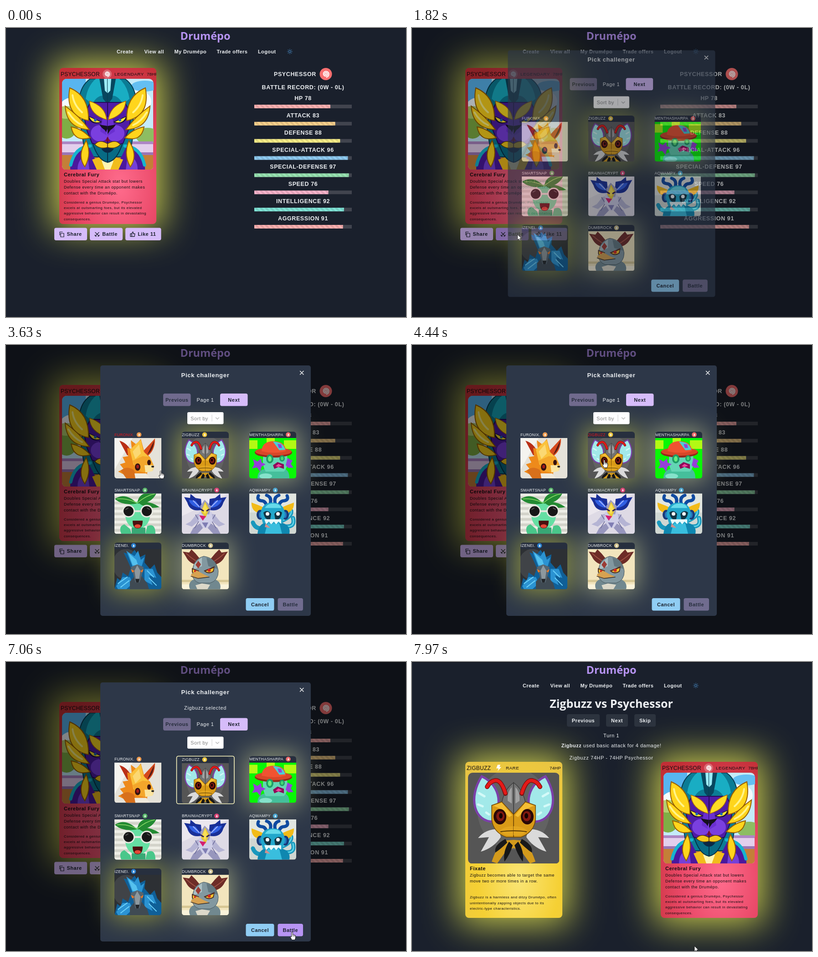
These frames come from a looping animation (878 by 637 pixels, 8 s). An HTML page:

```html
<!DOCTYPE html>
<html lang="en">
<head>
<meta charset="utf-8">
<title>Pick challenger</title>
<style>
  html, body { margin: 0; width: 100%; height: 100%; overflow: hidden; background: #1a202c; }
  svg { display: block; }
  text { font-family: "Liberation Sans", Arial, sans-serif; white-space: pre; }
  .display { font-family: "Open Sans", "Noto Sans", sans-serif; }
</style>
</head>
<body>
<svg id="stage" width="878" height="637" viewBox="0 0 878 637"></svg>
<script>
const LOOP = 8000;
const OPEN = 1610, SELECT = 4620, PRESS = 6880, RELEASE = 7060, FIGHT = 7150;
const LILAC = '#d6bcfa', LILAC_HOVER = '#b794f4', LILAC_DOWN = '#9f7aea', INK = '#1a202c', PALE = '#edf0f3';

// ---- drawing helpers ----
const path = (fill, d, extra = '') => `<path fill="${fill}" d="${d}" ${extra}/>`;
const line = (color, width, d) => path('none', d, `stroke="${color}" stroke-width="${width}" stroke-linecap="round" stroke-linejoin="round"`);
const dot = (fill, x, y, rx, ry = rx, extra = '') => `<ellipse fill="${fill}" cx="${x}" cy="${y}" rx="${rx}" ry="${ry}" ${extra}/>`;
const box = (fill, x, y, w, h, r = 0, extra = '') => `<rect fill="${fill}" x="${x}" y="${y}" width="${w}" height="${h}" rx="${r}" ${extra}/>`;
const at = (x, y, body, extra = '') => `<g transform="translate(${x} ${y})" ${extra}>${body}</g>`;
const mirror = (body, width = 200) => `${body}<g transform="matrix(-1 0 0 1 ${width} 0)">${body}</g>`;
const glow = (color, w, h, spread, blur, opacity) =>
  box(color, -spread, -spread, w + 2 * spread, h + 2 * spread, 8, `style="filter:blur(${blur}px)" opacity="${opacity}"`);
const shift = (dy, body) => `<g class="shift" data-dy="${dy}">${body}</g>`;

function text(x, y, content, size = 11, { fill = PALE, bold = false, anchor = 'start', spacing = .5, extra = '' } = {}) {
  return `<text x="${x}" y="${y + size * .36}" font-size="${size}" fill="${fill}" text-anchor="${anchor}"
    letter-spacing="${spacing}" font-weight="${bold ? 700 : 400}" ${extra}>${content}</text>`;
}
const centered = (x, y, content, size, options) => text(x, y, content, size, { anchor: 'middle', ...options });
const heading = (x, y, content, size, fill) => centered(x, y, content, size, { fill, bold: true, spacing: 0, extra: 'class="display"' });

function button(x, y, w, label, { fill = LILAC, color = INK, id = '', icon = '', extra = '' } = {}) {
  return `<g ${extra}>${box(fill, x, y, w, 27.5, 4, id && `id="${id}"`)}
    ${at(x + 16, y + 14, icon)}${centered(x + w / 2 + (icon ? 8 : 0), y + 14, label, 11, { fill: color, bold: true })}</g>`;
}

const swirl = line('#fff', 2, 'M' + Array.from({ length: 30 }, (_, i) => {
  const angle = i * .48, radius = 1 + i * .22;
  return `${(radius * Math.cos(angle)).toFixed(1)} ${(radius * Math.sin(angle)).toFixed(1)}`;
}).join('L'));
const bolt = path('#fff', 'M-2 -7H4L2 -2H6L-2 7L0 1H-5Z');

// ---- creatures: the two fighters on a 200 grid, the others on 103 x 89 ----
const art = {
  psychessor: box('#c4ebfa', 0, 0, 200, 200) + box('#58b5f0', 0, 0, 52, 60) +
    dot('#f4fbff', 30, 60, 34, 20) + dot('#f4fbff', 168, 50, 28, 24) + dot('#64bff2', 182, 16, 30, 12) +
    dot('#7fae45', 10, 96, 26, 36) + dot('#b3cf70', 8, 74, 20, 14) + dot('#8dbd62', 188, 126, 26, 18) +
    box('#e3cfec', 0, 138, 200, 30) + box('#ad86c4', 0, 138, 200, 6) + box('#9a76b5', 0, 162, 200, 6) + box('#c47f38', 0, 168, 200, 32) +
    mirror(
      path('#0b7c95', 'M100 0H62Q42 14 38 42L46 62 42 112 52 172H100Z', 'stroke="#063b50" stroke-width="2"') +
      path('#19adc3', 'M100 0H74Q56 16 52 44L66 56Q82 28 100 42Z') +
      path('#07475f', 'M82 0H100V56L90 44Z') + path('#9cecf7', 'M92 0H100V32L94 26Z') +
      path('#4b189d', 'M18 200Q16 165 58 148L84 200Z') + line('#16b4cf', 7, 'M62 148Q28 150 19 190') +
      path('#7440d8', 'M34 200Q34 175 56 168L60 200Z') +
      path('#f1bd1c', 'M66 178L100 168V200H76Z') + path('#fff6b4', 'M87 181L100 175V200H94Z') +
      path('#086b85', 'M66 138H100V184Q78 180 66 138Z', 'stroke="#052f48" stroke-width="2"') +
      path('#4f1ca6', 'M100 52L62 52 48 80 54 112 66 142 100 152Z', 'stroke="#250a59" stroke-width="2"') +
      dot('#7a3fdf', 83, 120, 20, 18) + path('#6a2fd0', 'M100 84L88 90 84 116 100 126Z') +
      path('#ffdc24', 'M60 49Q62 80 98 90Q95 60 60 49Z', 'stroke="#a76a08" stroke-width="1.5"') +
      path('#1c1038', 'M54 80L88 95Q64 106 54 80Z') + path('#ffe52e', 'M60 84L84 95Q66 100 60 84Z') + dot('#1e69b5', 73, 91, 3) +
      path('#15101d', 'M100 104L82 101Q88 110 93 112L100 122Z') + path('#8d1130', 'M100 126L95 138H100Z') +
      path('#f3c91d', 'M100 143Q82 132 72 145Q84 156 100 151Z', 'stroke="#5b3906" stroke-width="1.5"') +
      path('#0a2846', 'M100 152L86 154Q92 163 100 163Z') +
      ['M58 92Q6 82 17 20Q60 38 58 92Z', 'M60 112Q10 110 7 60Q38 82 60 112Z', 'M62 130Q26 140 20 106Q44 110 62 130Z', 'M53 136Q66 166 50 194Q36 174 46 150Z']
        .map(d => path('#ffd51c', d, 'stroke="#996000" stroke-width="2"')).join('') +
      line('#fff48a', 4, 'M23 36Q26 58 44 74M14 74Q26 94 44 102')),

  zigbuzz: box('#555', 0, 0, 200, 200) + dot('#626262', 100, 80, 80, 90) +
    mirror(
      path('#a2e9e9', 'M30 8C60 22 68 48 67 66L58 108C12 110 0 54 30 8Z', 'stroke="#7b40a8" stroke-width="5"') +
      line('#d4faf8', 5, 'M24 45L36 52M22 70L32 74M40 88L46 92') +
      path('#dadada', 'M68 124Q38 124 22 144L46 142 28 174Q56 166 72 142Z') +
      path('#d39a1c', 'M100 148L76 150Q62 166 52 196L64 200 84 172 100 166Z') +
      path('#191919', 'M82 146Q56 160 60 176Q72 168 86 154Z') + path('#161616', 'M90 152Q76 174 80 196Q92 180 98 160Z') +
      path('#737373', 'M100 22Q80 36 74 66L100 92Z', 'stroke="#3c3c3c" stroke-width="1.5"') + path('#a3a3a3', 'M96 32Q86 42 87 62L96 68Z') +
      path('#d99a17', 'M52 72L74 64 100 92V142H84Q56 132 52 104Z', 'stroke="#6f4705" stroke-width="1.5"') +
      path('#f4be35', 'M55 73L74 66 97 94 90 98Q74 78 55 73Z') +
      dot('#2a0907', 70, 97, 14, 17) + dot('#821a11', 71, 96, 9, 11) + dot('#150303', 72, 95, 4, 6) +
      path('#e2a51f', 'M100 118Q78 118 70 128Q78 140 100 138Z') + line('#563705', 2, 'M100 128Q84 128 72 130') +
      line('#791010', 10, 'M82 46Q73 16 60 17Q48 19 42 31') + line('#e51a18', 7, 'M82 45Q73 16 60 17Q48 19 42 31')),

  furonix: box('#e5e2d9', 0, 0, 103, 89) + path('#f5f4ef', 'M0 0H40L0 70Z') +
    path('#b92f16', 'M11 6Q32 12 40 38L28 38Z') + path('#d64a1c', 'M89 1Q90 28 70 42L64 28Z') + path('#571c16', 'M87 6Q86 26 72 37Z') +
    path('#ee8a1b', 'M24 82L8 74 20 68 12 58 24 54 18 42 30 40 28 22 38 24 36 5 48 14 58 2 66 32 78 42 70 89H32Z') +
    path('#fac23c', 'M34 26L46 14 58 4 64 30 76 42 56 46 42 60Z') + path('#fbd872', 'M40 30L54 14 58 34 46 46Z') +
    path('#f3a62b', 'M40 50L62 40 78 42 87 62 84 72 66 76 48 72Z') + path('#d8701b', 'M14 72Q26 60 42 70L52 89H26Z') +
    path('#fbe5a1', 'M66 60L86 60 84 73 68 76Z') + dot('#351210', 51, 64, 6, 8) + dot('#a41c1a', 51, 63, 3, 4) +
    dot('#351210', 76, 54, 4, 6) + dot('#222', 84, 63, 3, 2) + path('#efe9dc', 'M44 78L70 78 78 89H46Z'),

  menthasharpa: box('#09f706', 0, 0, 103, 89) + path('#b3f914', 'M0 5H18V24H0ZM38 0H56V14H38ZM76 5H103V24H76Z') +
    path('#45bf9b', 'M18 89Q18 70 36 68H74Q88 68 88 89Z') + path('#63d5b4', 'M32 34H82Q88 62 76 74H36Q26 56 32 34Z') +
    path('#9540d8', 'M8 46L18 52 26 45 27 54 36 58 27 63 24 74 17 65 6 67 11 58ZM84 44L95 50 91 57 97 65 86 66 80 60Z') +
    path('#8d0b59', 'M52 60L62 53 76 58 76 68 64 64 55 68Z') + path('#ef429b', 'M58 62L64 57 72 61 64 64Z') +
    dot('#92281b', 53, 32, 41, 11) + dot('#d84728', 53, 30, 40, 9) + path('#f05331', 'M27 29Q28 7 54 7Q80 8 80 29Q54 36 27 29Z') +
    path('#4cced5', 'M52 8Q74 8 79 26L66 27Z') + path('#9540d8', 'M62 13L70 14 72 22 65 22Z') +
    dot('#1f9c67', 45, 46, 8, 10) + dot('#64ed80', 45, 46, 4, 6) + dot('#1f9c67', 72, 45, 6, 7) + dot('#45d874', 72, 45, 3, 4) + dot('#85e2ca', 36, 84, 14, 6),

  smartsnap: box('#d3d3ca', 0, 0, 103, 89) + Array.from({ length: 8 }, (_, i) => box('#eeeee7', 0, i * 12, 103, 6)).join('') +
    path('#49c78a', 'M15 89Q8 72 22 68L34 78 38 89ZM68 89L72 72Q90 64 90 89Z') + dot('#65dfa3', 51, 48, 27, 30) + path('#38a875', 'M38 75H68V89H38Z') +
    path('#238a32', 'M50 22Q18 28 1 12Q24 -4 50 22ZM50 22Q54 -8 92 0Q80 24 50 22ZM52 20Q76 14 99 30Q70 36 52 20Z') + line('#8edb69', 1.5, 'M6 12Q28 10 50 21Q70 4 88 1') +
    mirror(dot('#e6e7df', 31, 39, 14) + dot('#171717', 31, 39, 11) + line('#525252', 2, 'M25 35L30 32'), 102) +
    box('#e6e7df', 42, 37, 18, 4) + path('#4a100f', 'M40 60H62Q62 77 51 77Q40 77 40 60Z') + dot('#e44837', 51, 72, 7, 4),

  brainiacrypt: box('#dedae5', 0, 0, 103, 89) + path('#ebe7ee', 'M0 0H103L0 50Z') +
    mirror(path('#192f97', 'M44 36Q18 42 12 20L5 8 18 10 19 1 30 10 42 12Z') + path('#315fe3', 'M42 32Q20 30 15 14L30 16Z') + line('#a7b8ff', 2, 'M25 16L38 29') +
      path('#b5b4d4', 'M48 42L32 46 19 62 8 68 22 73 38 60 52 66Z') + path('#9796bd', 'M45 62L25 76 18 89H34L50 72Z') + line('#686798', 1.5, 'M30 47L38 60L28 76'), 103) +
    path('#cfcee7', 'M38 40H65L68 60 57 76H46L36 60Z') + path('#9d9cc0', 'M40 28L50 14 64 28 60 46 44 46Z') + path('#e8ca35', 'M51 18L60 34 52 54 42 40Z') +
    path('#f9e058', 'M51 22L56 34 51 46 45 36Z') + line('#312057', 3, 'M42 35L47 38M60 35L55 38') + path('#d31f72', 'M38 48L53 50 46 60Z') + path('#7f7db3', 'M44 64H58L52 76Z'),

  aqwampy: box('#d0d7d2', 0, 0, 103, 89) + box('#e2e6e0', 0, 0, 103, 42) +
    line('#1998bd', 9, 'M72 60Q94 50 92 38M76 72Q102 76 96 54M32 76Q14 80 8 64') + line('#5fd4e8', 3, 'M72 60Q94 50 92 38M76 72Q102 76 96 54') +
    path('#0f87b0', 'M18 89Q20 68 36 64H70Q92 70 88 89Z') + path('#39bede', 'M40 66H66L72 89H34Z') +
    mirror(path('#f2bb18', 'M31 44Q4 44 5 20Q22 26 36 33Z') + line('#0f4aa0', 7, 'M38 28Q36 16 26 16Q16 14 20 5M46 22Q50 8 38 4') +
      dot('#183a7a', 24, 47, 8, 11) + dot('#257ac0', 25, 47, 4, 7), 103) +
    path('#22a7cb', 'M25 48Q25 20 51 20Q78 20 78 48L72 66H30Z') + path('#66daea', 'M34 32Q40 22 52 22Q68 22 70 32Z') +
    mirror(path('#113343', 'M31 42Q40 34 48 45L46 57Q34 60 31 42Z') + dot('#f4fcff', 40, 45, 4), 103) +
    path('#e5f9fb', 'M33 57H70V67L64 62 59 68 54 62 48 68 43 62 37 68Z') + path('#d1918e', 'M36 66L46 76 34 74Z'),

  izenei: box('#2d3034', 0, 0, 103, 89) + dot('#404347', 26, 34, 30, 34) +
    path('#0f5f97', 'M0 89L6 64 14 70 18 52 30 60 36 42 28 24 20 8 36 12 44 2 56 18 68 12 66 30 78 44 88 34 94 52 103 62V89Z') +
    path('#2b93d2', 'M26 4L44 16 52 4 58 24 66 18 60 38 40 40Z') + path('#55c1ee', 'M30 8L48 24 52 36 40 36Z') +
    path('#2b93d2', 'M4 82L18 62 34 62 40 76 26 89H8ZM66 44L84 44 92 64 76 58 84 80 66 70Z') +
    line('#6dd2fa', 2, 'M8 76L28 62M14 84L32 70M72 48L86 62M76 64L92 80') +
    path('#3f4a53', 'M34 72L44 60H60L72 76 76 89H34Z') + path('#566570', 'M36 40L50 34 64 40 60 58 55 74 46 74 42 58Z') +
    path('#8d989e', 'M50 36L57 48 54 68 47 68 44 48Z') + path('#f47a24', 'M36 44L44 49 39 52ZM64 44L57 49 61 52Z') + path('#22262a', 'M46 66H55L53 74H48Z'),

  dumbrock: box('#f2e5bd', 0, 0, 103, 89) + box('#d7c794', 0, 68, 103, 5) + box('#faf3da', 0, 78, 103, 11) +
    mirror(path('#6d2c27', 'M38 36Q17 34 9 17L2 6 16 8 21 1 30 10 44 27Z') + line('#a05245', 2, 'M10 10Q20 20 37 30'), 103) +
    path('#71888f', 'M18 89Q12 76 24 68L70 66Q88 72 84 89Z') + path('#8298a0', 'M23 57Q22 23 48 16Q76 20 80 49Q80 70 62 75H38Q24 70 23 57Z', 'stroke="#48565c" stroke-width="1"') +
    path('#abc0c4', 'M44 18L27 34 26 45 44 38Z') + path('#9b3c35', 'M36 26L42 34 36 43 30 35Z') + path('#647981', 'M54 19Q75 24 78 44L58 38Z') +
    path('#4f2d22', 'M22 42L38 48Q30 58 22 51ZM72 38L48 48Q58 58 70 50Z') + path('#f5c62f', 'M24 45L35 49Q28 55 24 51ZM70 42L52 49Q60 54 68 49Z') +
    dot('#d32b23', 29, 49, 2.5) + dot('#d32b23', 60, 47, 3.5) +
    path('#d7a251', 'M20 56L34 48 48 56 60 61 36 66 22 62Z') + line('#332c2c', 1.5, 'M20 60L36 65L60 62') + path('#dcd8c9', 'M30 80L44 76 62 79 56 89H34Z'),
};

// ---- large cards ----
const cards = {
  psychessor: { name: 'PSYCHESSOR', icon: [105, dot('rgba(255,255,255,.25)', 0, 0, 10) + `<g transform="scale(.8)">${swirl}</g>`],
    rarity: ['LEGENDARY', 121], hp: ['78HP', 192], skill: 'Cerebral Fury', paint: 'red',
    effect: ['Doubles Special Attack stat but lowers', 'Defense every time an opponent makes', 'contact with the Drumépo.'],
    lore: ['Considered a genius Drumépo, Psychessor', 'excels at outsmarting foes, but its elevated', 'aggressive behavior can result in devastating', 'consequences.'], loreY: 296 },
  zigbuzz: { name: 'ZIGBUZZ', icon: [73, bolt], rarity: ['RARE', 89], hp: ['74HP', 185], skill: 'Fixate', paint: 'yellow',
    effect: ['Zigbuzz becomes able to target the same', 'move two or more times in a row.'],
    lore: ['Zigbuzz is a harmless and ditzy Drumépo, often', 'unintentionally zapping objects due to its', 'electric-type characteristics.'], loreY: 298.5 },
};

function card(key, x, y) {
  const c = cards[key], black = { fill: '#120d10' };
  const lines = (list, top, gap, size, spacing) => list.map((s, i) => text(10, top + i * gap, s, size, { ...black, spacing })).join('');
  return at(x, y, glow('#f5f552', 213, 344, 14, 40, .8) + `<g clip-path="url(#cardClip)">` + box(`url(#${c.paint})`, 0, 0, 213, 344) +
    text(3, 13.5, c.name, 12, { ...black, spacing: .25 }) + at(c.icon[0], 13.5, c.icon[1]) +
    text(c.rarity[1], 13.5, c.rarity[0], 9.8, black) + text(c.hp[1], 13.5, c.hp[0], 9.8, { ...black, spacing: .1 }) +
    at(6, 24, art[key], 'clip-path="url(#artClip)"') + text(10, 235, c.skill, 11, { ...black, bold: true }) +
    lines(c.effect, 249.5, 13, 9, .53) + lines(c.lore, c.loreY, 12.3, 8, .46) + '</g>');
}

// ---- pages ----
const stats = [['HP', 78, '#feb2b2'], ['ATTACK', 83, '#fbd38d'], ['DEFENSE', 88, '#faf089'], ['SPECIAL-ATTACK', 96, '#90cdf4'],
  ['SPECIAL-DEFENSE', 97, '#9ae6b4'], ['SPEED', 76, '#fbb6ce'], ['INTELLIGENCE', 92, '#81e6d9'], ['AGGRESSION', 91, '#feb2b2']];
const statText = { bold: true, spacing: .6 };

const statRows = stats.map(([label, value, color], i) => {
  const w = 214 * value / 100;
  return at(545, 154.5 + i * 37.86, centered(107, 0, `${label} ${value}`, 12.5, statText) +
    at(0, 14.5, box('#41444e', 0, 0, 214, 8) + box(color, 0, 0, w, 8) + box('url(#stripes)', 0, 0, w, 8)));
}).join('');

const icons = {
  share: line(INK, 1.2, 'M-2 -2H5V6H-2ZM-4 2V-5H2'),
  battle: line(INK, 1.3, 'M-4 -4L4 4M4 -4L-4 4M-5 2L-2 5M5 2L2 5'),
  like: line(INK, 1.3, 'M-5 -1H-2V5H-5ZM-2 -1L0 -5Q2 -5 1 -1H5L4 5H-2'),
};
const sun = dot('none', 0, 0, 2.5, 2.5, 'stroke="#4e9ce0"') +
  Array.from({ length: 8 }, (_, i) => `<path d="M0 -4.4V-5.8" stroke="#4e9ce0" transform="rotate(${i * 45})"/>`).join('');

const header = heading(437.5, 18, 'Drumépo', 23.5, LILAC_HOVER) +
  [['Create', 243], ['View all', 303.5], ['My Drumépo', 369.5], ['Trade offers', 462.5], ['Logout', 553]]
    .map(([s, x]) => text(x, 52.5, s, 11, { bold: true, spacing: .4 })).join('') + at(623, 52, sun);

const profile = card('psychessor', 117, 88) +
  button(106, 440.5, 72, 'Share', { icon: icons.share }) +
  button(184, 440.5, 72, 'Battle', { icon: icons.battle, id: 'challenge' }) +
  button(262, 440.5, 78.5, 'Like 11', { icon: icons.like }) +
  text(588, 101.5, 'PSYCHESSOR', 12.5, statText) + at(702, 101.5, dot('#f86f70', 0, 0, 13.5) + swirl) +
  centered(652, 130.5, 'BATTLE RECORD: (0W - 0L)', 12.5, statText) + statRows;

const grey = { fill: '#2c333e', color: PALE };
const fight = card('zigbuzz', 117, 220) + card('psychessor', 546, 220) + heading(437.5, 91.5, 'Zigbuzz vs Psychessor', 25, PALE) +
  button(340, 115, 72, 'Previous', grey) + button(426, 115, 48, 'Next', grey) + button(488, 115, 47, 'Skip', grey) +
  centered(437.5, 162, 'Turn 1', 11, { spacing: .6 }) +
  centered(437.5, 184, '<tspan font-weight="700">Zigbuzz</tspan> used basic attack for 4 damage!', 11) +
  centered(437.5, 211.5, 'Zigbuzz 74HP - 74HP Psychessor', 11, { spacing: .6 });

// ---- challenger dialog: key, type colour, type icon x, glow colour ----
const challengers = [['furonix', '#ed9b50', 54], ['zigbuzz', '#ecc53c', 50, '#e0e04c'], ['menthasharpa', '#ef6a6a', 85.5, '#d9dc98'],
  ['smartsnap', '#5bb86c', 67], ['brainiacrypt', '#dd4577', 76.5], ['aqwampy', '#4ba5ce', 57],
  ['izenei', '#2c82cf', 42, '#d6d63c'], ['dumbrock', '#cdbf8c', 63, '#d9dc98']].map(([key, color, iconX, halo], i) => ({
    key, color, iconX, halo, x: 238 + i % 3 * 148, y: 191 + Math.floor(i / 3) * 122.3,
    dy: key === 'zigbuzz' ? 17.5 : i < 3 ? 16.5 : 19.5 }));

const halo = c => c.halo ? shift(c.dy, at(c.x, c.y, glow(c.halo, 103, 103, 8, 26, .55), `id="halo-${c.key}"`)) : '';
const thumb = c => shift(c.dy, at(c.x, c.y,
  (c.halo ? box('#272f3e', 0, 0, 103, 40, 6) : '') +
  text(0, 6.5, c.key.toUpperCase() + (/furonix|izenei/.test(c.key) ? '.' : ''), 8.7, { spacing: .25, extra: `id="name-${c.key}"` }) +
  at(c.iconX, 6.5, dot(c.color, 0, 0, 5.3) + path('#fff', 'M0 -3L2.2 1Q1 4 -1.6 2Z', 'opacity=".9"')) +
  at(0, 14, `<g transform="scale(${c.key === 'zigbuzz' ? .515 : 1})">${art[c.key]}</g>`, 'clip-path="url(#thumbClip)"')));

const dialog = box('#2d3748', 207, 45, 462, 552, 5, 'id="panel"') + challengers.map(halo).join('') + challengers.map(thumb).join('') +
  centered(437.5, 66, 'Pick challenger', 13, { bold: true, spacing: .7 }) + line('#fff', 1.4, 'M645.5 57.5L653 65M653 57.5L645.5 65') +
  `<g id="chosen">${centered(437.5, 101.5, 'Zigbuzz selected', 11, { spacing: .65 })}</g>` +
  shift(16.5, button(345, 107, 60.5, 'Previous', { fill: '#706a8d', color: '#252c3b' }) + centered(437.5, 121, 'Page 1') + button(470, 107, 60.5, 'Next') +
    box('#fff', 398, 148, 79.5, 26.5, 3) + text(405, 161.5, 'Sort by', 11.2, { fill: '#808080' }) +
    line('#ccc', 1, 'M452 154V168') + line('#bbb', 1.5, 'M460.5 160L464 163.5L467.5 160')) +
  box('none', 374.5, 207.5, 126.5, 105, 4, 'id="frame" stroke="#fbf5bd" stroke-width="1.6"') +
  shift(19, button(526.5, 558, 62, 'Cancel', { fill: '#90cdf4' }) + button(596.5, 558, 55.5, 'Battle', { id: 'confirm', extra: 'id="confirmBox"' }));

const arrow = path('#fff', 'M0 0V12L2.8 9.6L4.8 13.8L6.8 12.8L4.8 8.8H8.6Z', 'stroke="#111" stroke-width=".8"');
const hand = path('#fff', 'M-1.3 1Q0 -1 1.3 1V6Q3 5 3.6 6.5Q5 5.8 5.8 7.2Q7.6 6.8 7.6 9V13L6 17.5H-.5L-4 11Q-3.6 8.6 -1.3 11Z', 'stroke="#111" stroke-width=".9"') +
  line('#111', .7, 'M1.3 6V9.5M3.6 7V10M5.8 7.6V10');

const radial = (id, cx, stops) => `<radialGradient id="${id}" cx="${cx}" cy=".75" r=".85">` +
  stops.map((color, i) => `<stop offset="${i / (stops.length - 1)}" stop-color="${color}"/>`).join('') + '</radialGradient>';
const clip = (id, body) => `<clipPath id="${id}">${body}</clipPath>`;

const stage = document.getElementById('stage');
stage.innerHTML = `<defs>
  ${radial('red', .62, ['#ff6c8d', '#e94867', '#c22f36'])}${radial('yellow', .55, ['#fae575', '#f5d034', '#e8c443'])}
  ${clip('cardClip', box('#000', 0, 0, 213, 344, 8))}${clip('artClip', box('#000', 0, 0, 201, 201, 10))}
  ${clip('thumbClip', path('#000', 'M0 0H103V83Q103 89 97 89H6Q0 89 0 83Z'))}
  <pattern id="stripes" width="11" height="11" patternUnits="userSpaceOnUse">${path('rgba(0,0,0,.1)', 'M0 11V5.5L5.5 11ZM0 0H5.5L11 5.5V11Z')}</pattern>
  </defs>${box('#1a202c', 0, 0, 878, 637)}
  <g id="profile">${profile}</g><g id="fight">${fight}</g>${header}${box('#0b0e14', 0, 0, 878, 1)}
  ${box('#000', 0, 0, 878, 637, 0, 'id="dim"')}<g id="dialog">${dialog}</g>
  <g id="cursor"><g id="arrow">${arrow}</g><g id="hand">${hand}</g></g>`;

// ---- motion ----
const el = Object.fromEntries([...stage.querySelectorAll('[id]')].map(node => [node.id, node]));
const shifted = [...stage.querySelectorAll('.shift')];
const show = (node, on) => { node.style.display = on ? '' : 'none'; };
const set = (node, attribute, value) => node.setAttribute(attribute, value);

const route = [[0, 370, 660], [560, 370, 660], [1370, 232, 455], [1820, 232, 455], [2360, 74, 558], [2540, 132, 317], [2720, 235, 262],
  [2900, 330, 268], [3540, 330, 268], [3900, 368, 304], [4400, 422, 253], [4530, 422, 253], [5070, 575, 262], [5160, 575, 262],
  [5340, 438, 266], [5710, 438, 266], [6580, 628, 595], [7790, 628, 595], [7960, 620, 626], [LOOP, 620, 626]];

function cursorAt(t) {
  const i = route.findIndex(point => point[0] > t);
  const [t0, x0, y0] = route[i - 1], [t1, x1, y1] = route[i];
  const p = (t - t0) / (t1 - t0);
  return [x0 + (x1 - x0) * p, y0 + (y1 - y0) * p];
}

function draw() {
  const t = performance.now() % LOOP;
  const [x, y] = cursorAt(t);
  const inside = (left, top, w, h) => x >= left && x <= left + w && y >= top && y <= top + h;
  const selected = t >= SELECT, fighting = t >= FIGHT, open = t >= OPEN && !fighting;
  const opening = open ? Math.sin(Math.min(1, (t - OPEN) / 490) * Math.PI / 2) : 0;

  show(el.profile, !fighting);
  show(el.fight, fighting);
  show(el.dialog, open);
  set(el.dim, 'opacity', opening * .48);
  set(el.dialog, 'opacity', opening);
  set(el.dialog, 'transform', `translate(437.5 321) scale(${.96 + .04 * opening}) translate(-437.5 -321)`);

  show(el.chosen, selected);
  show(el.frame, selected);
  show(el['halo-zigbuzz'], !selected);
  set(el.panel, 'height', selected ? 571 : 552);
  set(el.confirmBox, 'opacity', selected ? 1 : .4);
  for (const node of shifted) set(node, 'transform', `translate(0 ${selected ? node.dataset.dy : 0})`);

  let pointing = false;
  for (const c of challengers) {
    const hovered = open && inside(c.x, c.y + (selected ? c.dy : 0), 103, 103);
    pointing ||= hovered;
    set(el['name-' + c.key], 'fill', hovered ? '#e8131b' : PALE);
  }
  const onChallenge = t < 2000 && inside(184, 440, 72, 28);
  const onConfirm = open && selected && inside(596, 577, 56, 28);
  set(el.challenge, 'fill', onChallenge ? LILAC_HOVER : LILAC);
  set(el.confirm, 'fill', !onConfirm ? LILAC : t >= PRESS && t < RELEASE ? LILAC_DOWN : LILAC_HOVER);

  pointing ||= onConfirm || (onChallenge && !open);
  show(el.hand, pointing);
  show(el.arrow, !pointing);
  set(el.cursor, 'transform', `translate(${x} ${y})`);
  requestAnimationFrame(draw);
}
draw();
</script>
</body>
</html>
```
